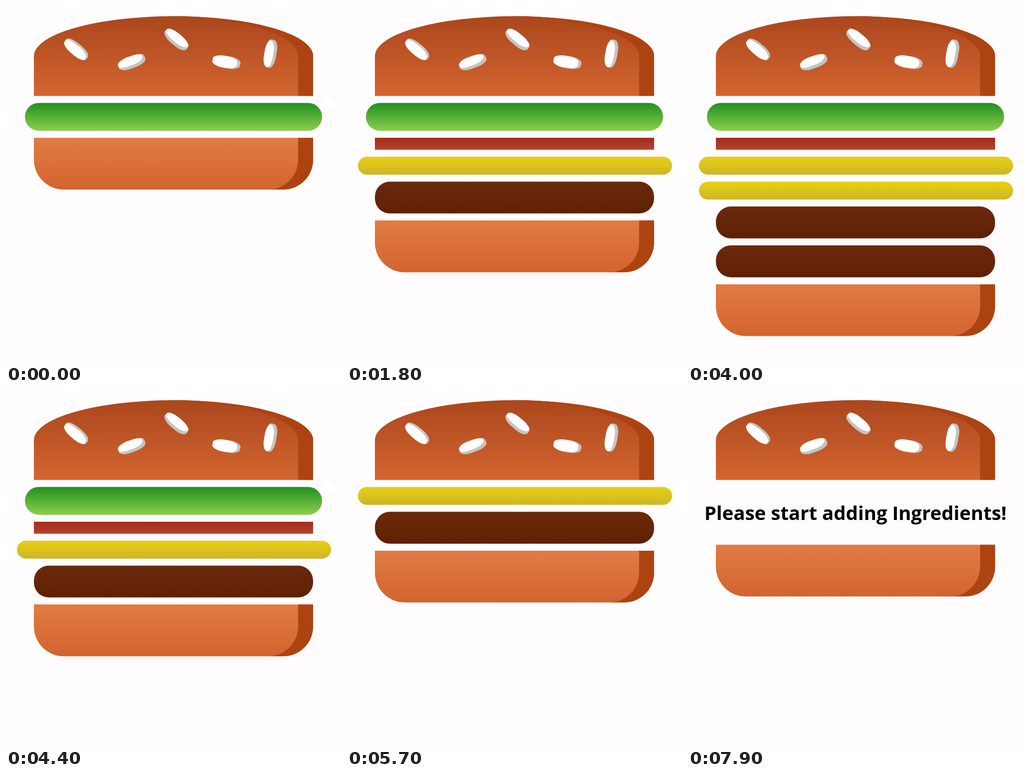
Write an HTML page that moves like this. It is 600 by 638 pixels and loops after 8 s.

```html
<!DOCTYPE html>
<html lang="en">
<head>
<meta charset="utf-8">
<title>Burger</title>
<style>
  html, body { margin: 0; width: 100%; height: 100%; overflow: hidden; background: #fffdfe; }
  .stage { position: relative; width: 100%; height: 100%; overflow: hidden; contain: strict; }

  /* Laid out on a grid 350 wide, then enlarged to the stage. */
  .burger {
    position: absolute; left: 0; top: 0; width: 350px;
    transform-origin: 0 0;
    transform: translate(-12.5px, 5.8px) scale(1.7857);
  }
  .burger > div { margin: 7px auto; width: 280px; }

  .top {
    position: relative; height: 80px;
    background: linear-gradient(#ab461d, #d36630);
    border-radius: 50% 50% 0 0;
    box-shadow: inset -15px 0 #ae4312;
  }
  .bottom {
    height: 52px;
    background: linear-gradient(#e27b44, #d2642f);
    border-radius: 0 0 30px 30px;
    box-shadow: inset -15px 0 #ae4312;
  }

  .seed, .seed::before, .seed::after {
    position: absolute; background: #fff; border-radius: 40%;
  }
  .seed { width: 28px; height: 12px; top: 40px; }
  .seed::before, .seed::after { width: 100%; height: 100%; }
  .left { left: 30%; transform: rotate(-20deg); box-shadow: inset -2px -3px #c3c3c3; }
  .left::before {
    content: ""; left: 180%; top: -50%;
    transform: rotate(60deg); box-shadow: inset -1px -3px #c3c3c3;
  }
  .left::after {
    content: ""; left: -170%; top: -260%;
    transform: rotate(60deg); box-shadow: inset -1px 2px #c3c3c3;
  }
  .right { left: 64%; transform: rotate(10deg); box-shadow: inset -3px 0 #c3c3c3; }
  .right::before {
    content: ""; left: 150%; top: -130%;
    transform: rotate(90deg); box-shadow: inset 1px 3px #c3c3c3;
  }

  .burger > .salad {
    width: 297.5px; height: 28px; border-radius: 20px;
    background: linear-gradient(#22901f, #8ad04e);
  }
  .bacon { height: 12px; background: linear-gradient(#a62818, #b34430); }
  .burger > .cheese {
    width: 315px; height: 18px; border-radius: 20px;
    background: linear-gradient(#e8d014, #cdb626);
  }
  .meat { height: 32px; border-radius: 15px; background: linear-gradient(#6b290b, #5e2004); }

  .hint {
    margin: 19.2px 0; text-align: center; white-space: nowrap; color: #000;
    font: bold 19.2px "Open Sans", sans-serif;
  }
</style>
</head>
<body>
<div class="stage">
  <div class="burger">
    <div class="top"><span class="seed left"></span><span class="seed right"></span></div>
    <p class="hint" hidden>Please start adding Ingredients!</p>
    <div class="salad"></div>
    <div class="bacon" hidden></div>
    <div class="cheese" hidden></div>
    <div class="cheese" hidden></div>
    <div class="meat" hidden></div>
    <div class="meat" hidden></div>
    <div class="bottom"></div>
  </div>
</div>
<script>
  const LOOP = 8000;
  // [time in ms, ingredient, amount added]
  const steps = [
    [0, 'salad', 1],
    [600, 'bacon', 1],
    [1000, 'cheese', 1],
    [1700, 'meat', 1],
    [2400, 'meat', 1],
    [3500, 'cheese', 1],
    [4100, 'meat', -1],
    [4400, 'cheese', -1],
    [5300, 'bacon', -1],
    [5700, 'salad', -1],
    [7300, 'meat', -1],
    [7800, 'cheese', -1]
  ];
  const kinds = ['salad', 'bacon', 'cheese', 'meat'];
  const layers = kinds.map(kind => document.querySelectorAll('.' + kind));
  const hint = document.querySelector('.hint');

  function draw() {
    const t = performance.now() % LOOP;
    let total = 0;
    kinds.forEach((kind, k) => {
      const count = steps.reduce((n, [at, name, add]) => at <= t && name === kind ? n + add : n, 0);
      layers[k].forEach((el, i) => { el.hidden = i >= count; });
      total += count;
    });
    hint.hidden = total > 0;
    requestAnimationFrame(draw);
  }
  draw();
</script>
</body>
</html>
```
